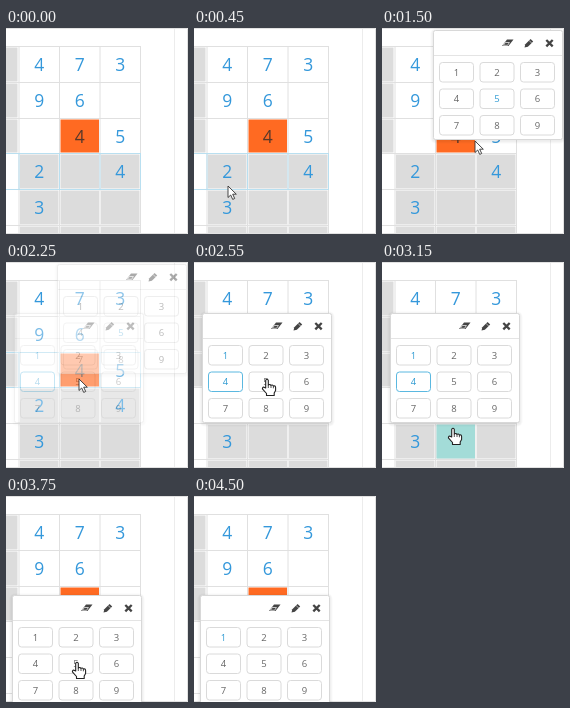
An HTML page for the animation above (5.1 s loop, 182x206 px).

```html
<!DOCTYPE html>
<html lang="en">
<head>
<meta charset="utf-8">
<title>Number picker</title>
<style>
  html, body { margin: 0; width: 100%; height: 100%; overflow: hidden; background: #fff; }
  svg { display: block; width: 182px; height: 206px; }
  text { text-anchor: middle; font-family: "Open Sans", "Noto Sans", sans-serif; }
  .digit { font-size: 17.5px; fill: #3498db; }
  .key { font-size: 9.5px; fill: #666; }
  .on { fill: #2f9bd3; }
</style>
</head>
<body>
<svg id="stage" viewBox="0 0 182 206"></svg>
<script>
const LOOP = 5100, STEP = 150;
const COLS = [13, 53.5, 94, 134.5];
const ROWS = [18.5, 54.5, 90.5, 125.5, 161.5, 197.5, 233];
const BOARD = ['473', '96 ', ' 45', '2 4', '3  ', '   '];
const stage = document.getElementById('stage');

function add(parent, tag, attrs, text) {
  const el = document.createElementNS('http://www.w3.org/2000/svg', tag);
  for (const k in attrs) el.setAttribute(k, attrs[k]);
  if (text) el.textContent = text;
  parent.appendChild(el);
  return el;
}
const rect = (p, x, y, width, height, fill, more) =>
  add(p, 'rect', { x, y, width, height, fill, ...more });
const line = (p, d, stroke, more) =>
  add(p, 'path', { d, stroke, fill: 'none', ...more });
const show = (el, on) => el.setAttribute('visibility', on ? 'visible' : 'hidden');

function cellFill(col, row, fill) {
  return rect(stage, COLS[col] + 1, ROWS[row] + 1,
    COLS[col + 1] - COLS[col] - 2, ROWS[row + 1] - ROWS[row] - 2, fill);
}

// Page and board
rect(stage, 0, 0, 182, 206, '#fff');
line(stage, 'M168.5 0V206', '#ececec');
for (let r = 0; r < 6; r++) {
  if (r < 3) rect(stage, 0, ROWS[r] + 1, 11.5, ROWS[r + 1] - ROWS[r] - 2, '#dcdcdc');
  else for (let c = 0; c < 3; c++) cellFill(c, r, '#dcdcdc');
}
line(stage, ROWS.map(y => `M0 ${y}H135`).join('') +
  COLS.map(x => `M${x} 18V206`).join(''), '#e0e0e0');

const tealTop = cellFill(2, 1, '#a3dcd8');
const tealLow = cellFill(1, 4, '#a3dcd8');
cellFill(1, 2, '#ff6a22');

const rowHover = [2, 3].map(r => line(stage,
  `M0 ${ROWS[r]}H135M0 ${ROWS[r + 1]}H135` +
  COLS.map(x => `M${x} ${ROWS[r]}V${ROWS[r + 1]}`).join(''), '#b9dff0'));

BOARD.forEach((s, r) => [...s].forEach((n, c) => {
  if (n === ' ') return;
  const el = add(stage, 'text', { class: 'digit',
    x: (COLS[c] + COLS[c + 1]) / 2, y: (ROWS[r] + ROWS[r + 1]) / 2 + 6.5 }, n);
  if (r === 2 && c === 1) el.style.fill = '#57382a';
}));
line(stage, 'M0 .5H181.5V205.5H0', '#e2e2e2');

// Picker with its toolbar and nine keys
function picker(x, y, blue, selected) {
  const g = add(stage, 'g', { transform: `translate(${x} ${y})` });
  for (let i = 3; i > 0; i--)
    rect(g, -i + .5, -i + 1.5, 129 + 2 * i, 109 + 2 * i, '#000', { rx: 2 + i, opacity: .025 });
  rect(g, .5, .5, 129, 109, '#fff', { rx: 2, stroke: '#d8d8d8' });
  line(g, 'M1 25.5H129', '#e4e4e4');
  add(g, 'path', { d: 'M69 16L74 9.5H80.5L75.5 16Z', fill: '#444' });
  line(g, 'M70.3 15.3L72.4 12.5H76.4L74.6 15.3Z', '#fff', { 'stroke-width': .7 });
  add(g, 'path', { d: 'M91.5 17.5L92.3 14.2L97.6 8.9L100.2 11.5L94.9 16.8Z', fill: '#444' });
  line(g, 'M96 10.4L98.7 13.1', '#fff', { 'stroke-width': .6 });
  line(g, 'M113.3 10L119.7 16.4M119.7 10L113.3 16.4', '#444', { 'stroke-width': 2.3 });
  const keys = [];
  for (let n = 1; n <= 9; n++) {
    const kx = 6.5 + (n - 1) % 3 * 40.5, ky = 32.5 + Math.floor((n - 1) / 3) * 26.5;
    rect(g, kx, ky, 34, 19.5, '#fff', { rx: 3, stroke: n === selected ? '#5bb8e0' : '#dadada' });
    keys[n] = add(g, 'text', { class: 'key', x: kx + 17, y: ky + 13.4 }, String(n));
    if (blue.includes(n)) keys[n].classList.add('on');
  }
  return { g, keys };
}
const pickers = [picker(51, 2, [5]), picker(8, 51, [1, 4], 4), picker(6, 99, [])];

// Opacity of each picker: [time, value], held until the next entry
const FADES = [
  [[0, 0], [900, .1], [1050, .65], [1200, 1], [2250, .45], [2400, 0]],
  [[0, 0], [2250, .35], [2400, .85], [2550, 1], [3600, .45], [3750, 0]],
  [[0, 0], [3600, .55], [3750, 1]]
];
const held = (steps, t) => steps.filter(s => s[0] <= t).pop()[1];

// Pointers
const arrow = add(stage, 'path', {
  d: 'M0 0V11.5L2.7 9L4.7 13.4L6.7 12.5L4.7 8.2H8.3Z',
  fill: '#fff', stroke: '#333', 'stroke-width': .9 });
const hand = add(stage, 'path', {
  d: 'M-1.3 9V1.2Q0-.8 1.3 1.2V6Q2.8 4.8 4 6.4Q5.4 5.4 6.4 7Q8.4 6.4 8.6 8.5V11.5L7.2 14V16.5H-.5V14.5L-4.6 9.8Q-4.4 7.4-2.4 8.4Z',
  fill: '#fff', stroke: '#222', 'stroke-width': 1.1, 'stroke-linejoin': 'round' });
const handLines = line(stage, 'M1.3 6V9M4 6.4V9M6.4 7V9.3', '#222', { 'stroke-width': .8 });

const PATH = [
  [300, 4, 166], [450, 34, 158], [600, 70, 132], [750, 104, 88], [900, 116, 69],
  [1200, 116, 69], [1350, 110, 86], [1500, 93, 113], [1650, 78, 148], [1800, 72, 140],
  [1950, 73, 117], [2550, 73, 117], [3000, 72, 163], [3150, 71, 166],
  [3750, 71, 166], [4050, 45, 157], [4350, 5, 143], [4500, -16, 138]
];
function pointAt(t) {
  const i = PATH.findIndex(p => p[0] >= t);
  if (t < PATH[0][0] || i < 0) return [-30, 140];
  if (i === 0) return PATH[0].slice(1);
  const [t0, x0, y0] = PATH[i - 1], [t1, x1, y1] = PATH[i];
  const k = (t - t0) / (t1 - t0);
  return [x0 + (x1 - x0) * k, y0 + (y1 - y0) * k];
}

function draw(now) {
  const t = Math.floor(now % LOOP / STEP) * STEP;
  pickers.forEach((p, i) => p.g.setAttribute('opacity', held(FADES[i], t)));
  pickers[2].keys[1].classList.toggle('on', t >= 4200);
  show(tealTop, t >= 750 && t < 1500);
  show(tealLow, t >= 3000 && t < 3750);
  show(rowHover[0], t >= 1950 && t < 2550);
  show(rowHover[1], t < 600);
  const [x, y] = pointAt(t), isHand = t >= 2400;
  for (const el of [arrow, hand, handLines]) {
    el.setAttribute('transform', `translate(${x} ${y})`);
    show(el, (el !== arrow) === isHand);
  }
}

const start = performance.now();
function tick() {
  draw(performance.now() - start);
  requestAnimationFrame(tick);
}
tick();
</script>
</body>
</html>
```
